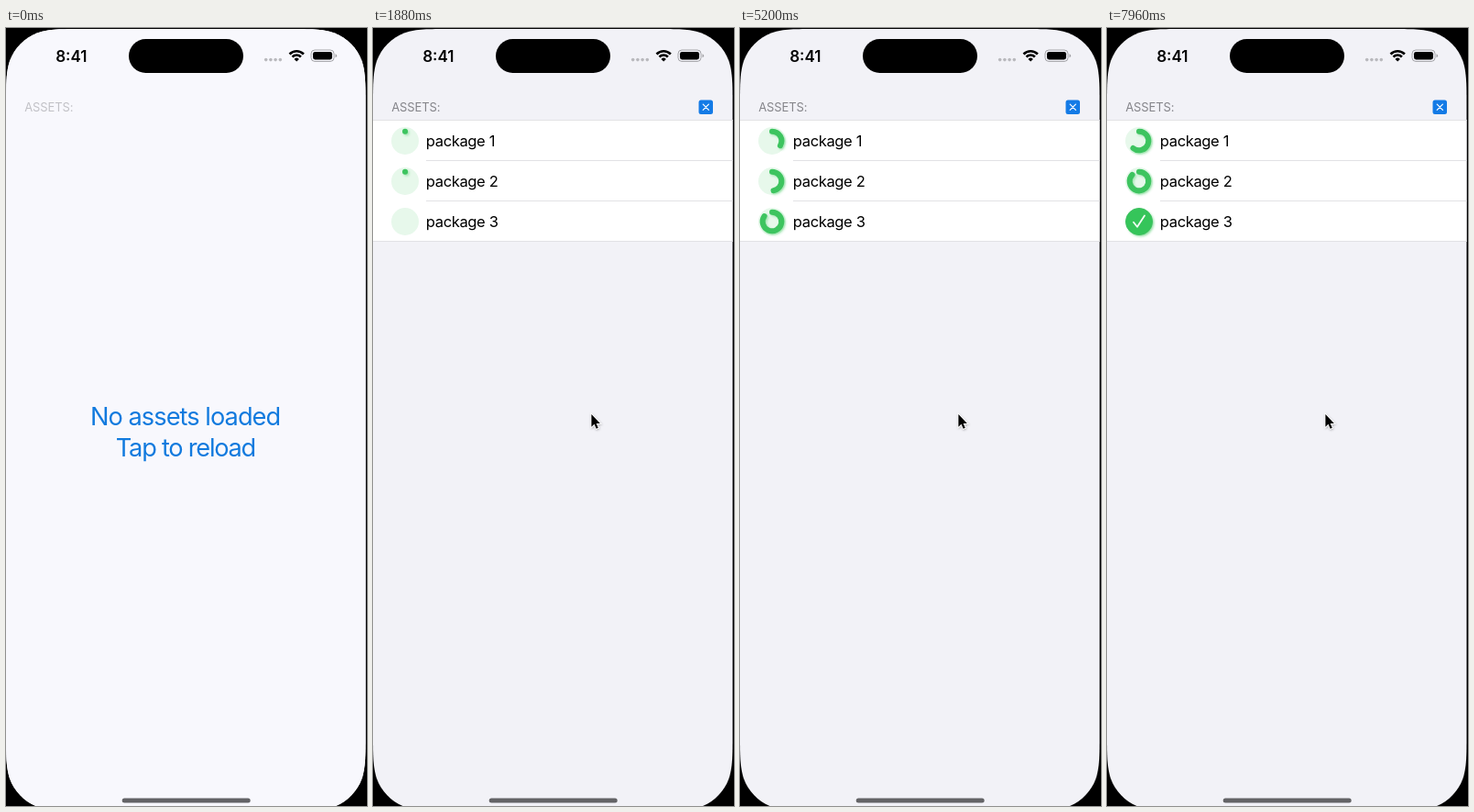
An HTML page for the animation above (8 s loop, 394 by 848 pixels).

```html
<!DOCTYPE html>
<html lang="en">
<head>
<meta charset="utf-8">
<title>Assets</title>
<style>
  html, body { margin: 0; width: 100%; height: 100%; overflow: hidden; background: #000; }
  svg { display: block; width: 394px; height: 848px; }
  text { font-family: Inter, "Liberation Sans", sans-serif; font-optical-sizing: none; }
  .head { font-size: 13px; letter-spacing: -.1px; fill: #85858a; }
  .row { font-size: 16.5px; letter-spacing: -.35px; }
  .big { font-size: 27.2px; letter-spacing: -.95px; fill: #117ade; text-anchor: middle; }
  .tight { letter-spacing: -1.25px; }
  .time { font-size: 17px; font-weight: 600; }
  .arc { fill: none; stroke: #3cc45f; stroke-width: 6; stroke-linecap: round; }
  .line { fill: none; stroke: #e2e2e5; }
</style>
</head>
<body>
<svg viewBox="0 0 394 848" xmlns="http://www.w3.org/2000/svg">
  <defs>
    <clipPath id="screen"><path id="outline"/></clipPath>
    <filter id="glow" filterUnits="userSpaceOnUse" x="10" y="95" width="60" height="145">
      <feDropShadow dx="1.5" dy="1.5" stdDeviation="1.3" flood-color="#34c759" flood-opacity=".4"/>
    </filter>
    <filter id="soft" x="-50%" y="-50%" width="200%" height="200%">
      <feDropShadow dx=".5" dy="1" stdDeviation=".8" flood-opacity=".3"/>
    </filter>
  </defs>

  <g clip-path="url(#screen)">
    <rect width="394" height="854" fill="#f2f2f7"/>
    <rect id="veil" width="394" height="854" fill="#f8f8fd"/>
    <text id="head" class="head" x="20.2" y="90.5">ASSETS:</text>

    <g id="empty">
      <text class="big" x="195.6" y="432.5">No assets loaded</text>
      <text class="big tight" x="195.9" y="466.5">Tap to reload</text>
    </g>

    <g id="list">
      <rect y="100" width="394" height="133" fill="#fff"/>
      <path class="line" d="M0 100.5H394M58 144.5H394M58 188.5H394M0 232.5H394"/>
      <g id="rows"></g>
      <rect x="355.5" y="78.5" width="15.5" height="15.5" rx="2.5" fill="#147be6"/>
      <path d="M360.2 83.2l6.2 6.2M366.4 83.2l-6.2 6.2" stroke="#fff" stroke-width="1.2" stroke-linecap="round"/>
    </g>

    <text class="time" x="54.2" y="36.5">8:41</text>
    <rect x="134" y="12" width="125" height="37" rx="18.5"/>
    <g fill="#b9b9bd">
      <circle cx="283.7" cy="34.6" r="1.8"/><circle cx="288.9" cy="34.6" r="1.8"/>
      <circle cx="294.1" cy="34.6" r="1.8"/><circle cx="299.3" cy="34.6" r="1.8"/>
    </g>
    <g fill="none" stroke="#000" stroke-width="2.6">
      <path d="M309.5 28.5a10.9 10.9 0 0 1 15.4 0"/>
      <path d="M312.5 31.5a6.7 6.7 0 0 1 9.4 0"/>
    </g>
    <path d="M317.2 36.6l-2.7-2.7a3.8 3.8 0 0 1 5.4 0z"/>
    <rect x="333" y="24" width="25" height="12.4" rx="4" fill="none" stroke="#a2a2a6"/>
    <rect x="335" y="26" width="21" height="8.4" rx="2.3"/>
    <path d="M359.5 28.2q1.6 .6 1.6 2t-1.6 2z" fill="#a2a2a6"/>
    <rect x="126.7" y="839.5" width="140" height="5" rx="2.5" fill="#636366"/>
  </g>

  <path id="cursor" filter="url(#soft)" stroke="#fff" stroke-width="1.6" paint-order="stroke"
    d="M238.4 421v13.7l3.1-2.9 2.2 4.9 2.1-.9-2.1-4.8h4.2z"/>
</svg>
<script>
const LOOP = 8000;
const R = 10.3, CX = 35;
const $ = id => document.getElementById(id);
const clamp = v => Math.max(0, Math.min(1, v));
const ease = v => v * v * (3 - 2 * v);

// start in ms, rate in turns per second
const packages = [
  { y: 123, start: 1870, rate: .1 },
  { y: 167, start: 1870, rate: .143 },
  { y: 211, start: 1890, rate: .256 }
];

// Smooth screen corners, mirrored from one quarter
function outline(x0, y0, x1, y1, r) {
  const pts = [[0, 1.529], [0, 1.088], [0, .868], [.075, .631],
    [.169, .373], [.373, .169], [.631, .075], [.868, 0], [1.088, 0], [1.529, 0]];
  const corner = (x, y, sx, sy, list, cmd) => {
    const p = list.map(([a, b]) => `${x + sx * a * r} ${y + sy * b * r}`);
    return `${cmd}${p[0]}C${p.slice(1).join(' ')}`;
  };
  const back = [...pts].reverse();
  return corner(x0, y0, 1, 1, pts, 'M') + corner(x1, y0, -1, 1, back, 'L') +
    corner(x1, y1, -1, -1, pts, 'L') + corner(x0, y1, 1, -1, back, 'L') + 'Z';
}
$('outline').setAttribute('d', outline(0, 1, 392.5, 853, 55));

$('rows').innerHTML = packages.map(({ y }, i) => `
  <circle cx="${CX}" cy="${y}" r="15" fill="#e7f8eb"/>
  <path class="arc" id="arc${i}" filter="url(#glow)"/>
  <g id="done${i}">
    <circle cx="${CX}" cy="${y}" r="14.5" fill="#36c55a" stroke="#3cbf5e" filter="url(#glow)"/>
    <path d="M29 ${y + .8}l4 5 8-12.3" fill="none" stroke="#f2fbf4" stroke-width="1.8"
      stroke-linecap="round" stroke-linejoin="round"/>
  </g>
  <text class="row" x="57.8" y="${y + 6}">package ${i + 1}</text>`).join('');

function arc(y, p) {
  const a = Math.min(p, .9995) * 2 * Math.PI;
  const x2 = CX + R * Math.sin(a), y2 = y - R * Math.cos(a);
  return `M${CX} ${y - R}A${R} ${R} 0 ${p > .5 ? 1 : 0} 1 ${x2} ${y2}`;
}

function draw(t) {
  const k = ease(clamp((t - 1100) / 340));
  $('veil').style.opacity = $('empty').style.opacity = 1 - k;
  $('list').style.opacity = k;
  $('head').style.opacity = .47 + .53 * k;
  $('cursor').style.visibility = t >= 1160 ? 'visible' : 'hidden';

  packages.forEach(({ y, start, rate }, i) => {
    const p = (t - start) / 1000 * rate;
    const el = $('arc' + i);
    el.style.visibility = p > 0 ? 'visible' : 'hidden';
    if (p > 0) el.setAttribute('d', arc(y, Math.max(p, .001)));
    const full = start + 1000 / rate;
    $('done' + i).style.opacity = ease(clamp((t - full) / 220));
  });
}

function tick() {
  draw(performance.now() % LOOP);
  requestAnimationFrame(tick);
}
tick();
</script>
</body>
</html>
```
